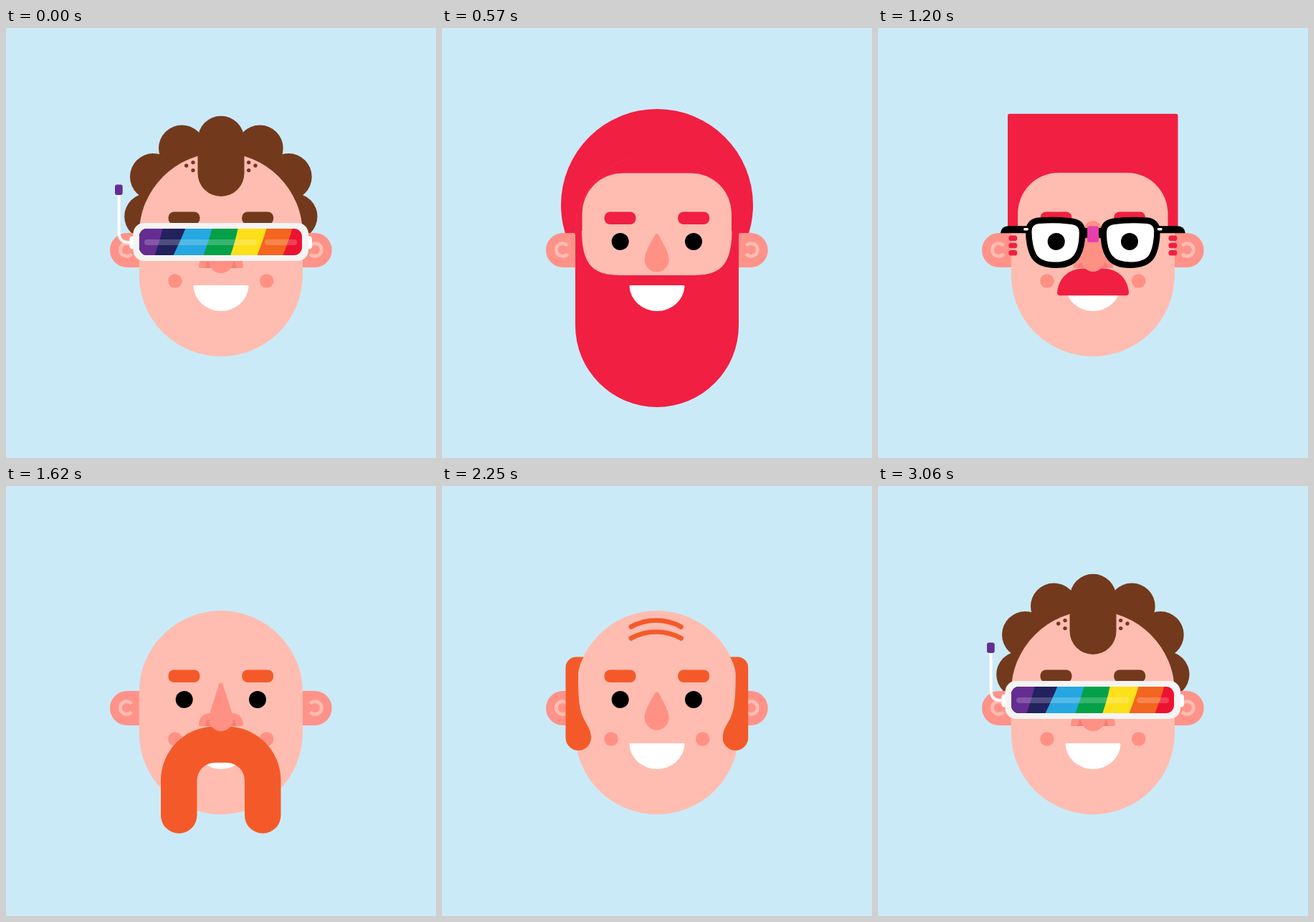
An HTML page that plays this animation: 600 px wide and 600 px high, repeating every 3.12 s.

```html
<!DOCTYPE html>
<html lang="en">
<head>
<meta charset="utf-8">
<title>Faces</title>
<style>
html, body { margin: 0; width: 100%; height: 100%; overflow: hidden; background: #cbeaf7; }
svg { display: block; width: 100%; height: 100%; }
</style>
</head>
<body>
<svg viewBox="0 0 600 600"><g id="face"></g></svg>
<script>
const LOOP = 3120;
const SKIN = '#ffbdb1', EAR = '#ff9289', BLUSH = '#ff9184', SHADE = '#f47f75';
const BROWN = '#73391c', RED = '#f11f42', ORANGE = '#f45a29', BLACK = '#000', WHITE = '#fff';

const path = (d, fill, extra = '') => `<path d="${d}" fill="${fill}" ${extra}/>`;
const line = (d, color, width) =>
  path(d, 'none', `stroke="${color}" stroke-width="${width}" stroke-linecap="round" stroke-linejoin="round"`);
const circle = (x, y, r, fill, extra = '') => `<circle cx="${x}" cy="${y}" r="${r}" fill="${fill}" ${extra}/>`;
const oval = (y, rx, ry, fill) => `<ellipse cx="300" cy="${y}" rx="${rx}" ry="${ry}" fill="${fill}"/>`;
const rect = (x, y, w, h, r, fill, extra = '') =>
  `<rect x="${x}" y="${y}" width="${w}" height="${h}" rx="${r}" fill="${fill}" ${extra}/>`;
const mirror = s => s + `<g transform="matrix(-1 0 0 1 599.7 0)">${s}</g>`;

const HAIRLINE = 'H404.5 V259 A57 57 0 0 0 347.5 202 H252 A57 57 0 0 0 195 259 V283';
const cap = c => path(`M186 283 V288 A114 114 0 0 1 414 288 V283 ${HAIRLINE} Z`, c, `stroke="${c}"`);

// Each hair style has a part behind the head and a part in front of it.
const hair = {
  curly: {
    back: c => path('M205 207 L245 168 L300 155 L354 168 L393 207 L402 263 H197 Z', c) +
      circle(300, 155, 32.3, c) +
      mirror(circle(245.5, 168, 32.5, c) + circle(205.5, 207.5, 32.5, c) + circle(197.5, 263, 32.3, c)),
    front: c => path('M267.5 172 H332.5 V202.5 A32.5 32.5 0 0 1 267.5 202.5 Z', c) +
      mirror(circle(251.7, 192, 2.7, c) + circle(261, 187.6, 2.7, c) + circle(261, 198.6, 2.7, c))
  },
  flat: {
    front: c => path(`M181 283 V122 Q181 119.7 183.5 119.7 H416 Q418.5 119.7 418.5 122 V283 ${HAIRLINE} Z`, c),
    top: c => mirror([289.5, 299.8, 310].map(y => rect(182.3, y, 12, 7.5, 3.6, c)).join(''))
  },
  bald: {
    top: c => mirror(path('M187.5 238.4 H197.6 Q191 250 190 262 C190 292 191 310 197 323 C201 332 208 339 208 351.3 ' +
        'A17.75 17.75 0 0 1 172.5 351.3 V253.4 A15 15 0 0 1 187.5 238.4 Z', c)) +
      line('M263.8 196.5 A72.5 72.5 0 0 1 333.6 196.5 M263.8 212.5 A72.5 72.5 0 0 1 333.6 212.5', c, 6.6)
  },
  afro: { back: c => circle(300, 282, 151, c), front: cap },
  round: { back: c => circle(300, 247, 134, c), front: cap },
  tall: { back: c => oval(254, 153, 170, c), front: cap },
  long: { back: c => path('M147.5 281.5 A152.5 152.5 0 0 1 452.5 281.5 V430 Q452.5 450 432.5 450 H167.5 Q147.5 450 147.5 430 Z', c), front: cap },
  quiff: { back: c => oval(260, 128, 120, c), front: cap },
  crop: { back: c => oval(274, 133, 118, c), front: cap }
};

const dome = 'M269 335 Q269 317 285 317 H315 Q331 317 331 335 Z';
const wings = path(dome, BLUSH) + mirror(path('M278 335 Q279 326 286 323 L292 335 Z', SHADE));
const noses = {
  sharp: wings + path('M297 277 Q299.8 271 302.6 277 L316.5 320 H283.5 Z', BLUSH) + circle(300, 325, 17, BLUSH),
  drop: path('M296.5 290 Q299.8 284 303 290 C308 300 316.7 313 316.7 323.5 A17 17 0 0 1 282.7 323.5 C282.7 313 291 300 296.5 290 Z', BLUSH),
  column: path('M272 335 Q272 318 284 318 H316 Q328 318 328 335 Z', BLUSH) +
    mirror(path('M279 335 Q280 328 286 326 L292 335 Z', SHADE)) +
    path('M288 281 A12 12 0 0 1 312 281 L316 324 A16 16 0 0 1 284 324 Z', BLUSH)
};

const whiskers = {
  shoe: c => path('M216 459.5 V411 A75.5 75.5 0 0 1 291.5 335.5 H308 A75.5 75.5 0 0 1 383.5 411 V459.5 ' +
    'A25.25 25.25 0 0 1 333 459.5 V411 A25 25 0 0 0 308 386 H291.5 A25 25 0 0 0 266.5 411 V459.5 A25.25 25.25 0 0 1 216 459.5 Z', c),
  brush: c => path('M250 369 C252 347 268 335.5 287 335.5 H313 C332 335.5 348 347 350 369 Q350 373.3 346 373.3 H254 Q250 373.3 250 369 Z', c),
  goatee: c => path('M296 405 Q299.8 399 303.6 405 C308 419 317 436 317 451 A17.1 17.1 0 0 1 282.8 451 C282.8 436 292 419 296 405 Z', c)
};
const beard = (bottom, c) => path('M186 282 H195 C195 335 215 345 250 345 H350 C385 345 404.5 335 404.5 282 H414 ' +
  `V${bottom - 114} A114 114 0 0 1 186 ${bottom - 114} Z`, c);

const LENS = 'M210.3 283 C210.5 274 216 269.5 224 268.8 Q249 266.5 272 270 C281 271.5 285 277 285 285 ' +
  'C285 300 282 313 276 320.5 C270 328 261 330.7 248 330.7 C234 330.7 224 328 218 319 C212.5 310 210 295 210.3 283 Z';
const frame = fill => mirror(
  path('M171 286.3 Q172 276.3 182 276.3 H212 V286.3 Z', BLACK) +
  path(LENS, fill, `stroke="${BLACK}" stroke-width="8.5"`) +
  rect(203, 279, 7, 3.5, 1.7, WHITE)) +
  path('M284 278 Q300 281 316 278 V295 Q300 288 284 295 Z', BLACK);

const glint = line('M220 305 L243 282 M227 315 L244 298 M250 292 L263 279', '#686868', 7);

function goggles() {
  const tones = ['#652d91', '#22225f', '#26a7e1', '#05a148', '#fde01a', '#f4651f', '#ed1230'];
  const tops = [219, 251, 288, 324, 364, 400], feet = [207, 233, 275, 313, 350, 386];
  let s = rect(186, 280, 227, 37, 11, tones[6]);
  for (let i = 5; i >= 0; i--) {
    const a = tops[i], b = feet[i];
    s += path(`M180 278 H${a} Q${(a + b) / 2 + 2} 296 ${b} 318 H180 Z`, tones[i], 'clip-path="url(#visor)"');
  }
  return '<clipPath id="visor">' + rect(186, 280, 227, 37, 11, WHITE) + '</clipPath>' +
    line('M157.5 233 V284 Q157.5 299 170 299 H178', WHITE, 4) +
    rect(152, 218.5, 10.7, 14.5, 3, '#652d91') +
    rect(172.5, 290.5, 14, 18, 4, WHITE) + rect(413, 290.5, 14, 18, 4, WHITE) +
    rect(177.5, 272, 244.5, 53, 15, '#f4f4f4') + s +
    rect(193, 295, 157, 8, 4, WHITE, 'opacity=".2"') + rect(361, 295, 45, 8, 4, WHITE, 'opacity=".2"');
}

const glasses = {
  goggles,
  shades: () => frame('#404040') + glint + `<g transform="translate(104 0)">${glint}</g>`,
  square: () => frame(WHITE),
  taped: () => frame(WHITE) + rect(292, 276.5, 16, 22.5, 3, '#e83fae'),
  round: () => mirror(line('M213 289 L184 279.5 Q176 277.5 174.5 285', BLACK, 8) +
    circle(249, 298.5, 35, WHITE, `stroke="${BLACK}" stroke-width="8"`)) +
    line('M286 294 Q289 285 300 285 Q311 285 314 294', BLACK, 8)
};

const base = mirror(path('M187 286 H169 A24 24 0 0 0 169 334 H187 Z', EAR) +
  path('M175.3 303.8 A9 9 0 1 0 175.3 315.2', 'none', `stroke="${SKIN}" stroke-width="4.8"`)) +
  rect(185.7, 174, 228.3, 284.3, 114, SKIN);
const mouth = path('M263 359 H337 Q338.5 359 338.5 361 A38.6 36.6 0 0 1 261.5 361 Q261.5 359 263 359 Z', WHITE);

function draw({ c, style, nose = 'sharp', hairs = [], chin, specs }) {
  const h = hair[style] || {};
  const part = k => h[k] ? h[k](c) : '';
  const hidden = specs === 'goggles' || specs === 'shades';
  return part('back') + base + part('front') +
    mirror(circle(236, 353, 9.8, BLUSH)) +
    part('top') +
    mirror(rect(226.5, 256.5, 44, 17.5, 8, c)) +
    (chin ? beard(chin, c) : '') + mouth +
    hairs.map(k => whiskers[k](c)).join('') +
    noses[nose] +
    (specs ? glasses[specs]() : '') +
    (hidden ? '' : mirror(circle(248.7, 298, 12, BLACK)));
}

const cast = [
  [0, { c: BROWN, style: 'curly', specs: 'goggles' }],
  [150, { c: BROWN, style: 'afro', chin: 489 }],
  [360, { c: BLACK, style: 'bald', nose: 'column', hairs: ['shoe'], specs: 'shades' }],
  [570, { c: RED, style: 'round', nose: 'drop', chin: 529 }],
  [780, { c: BROWN, hairs: ['brush', 'goatee'], specs: 'round' }],
  [990, { c: BLACK, style: 'flat', nose: 'drop', specs: 'square' }],
  [1200, { c: RED, style: 'flat', nose: 'column', hairs: ['brush'], specs: 'taped' }],
  [1410, { c: BLACK, style: 'curly', chin: 489 }],
  [1620, { c: ORANGE, hairs: ['shoe'] }],
  [1830, { c: BROWN, style: 'long' }],
  [2040, { c: BLACK, style: 'quiff', nose: 'column' }],
  [2250, { c: ORANGE, style: 'bald', nose: 'drop' }],
  [2460, { c: BROWN, style: 'crop', hairs: ['brush', 'goatee'] }],
  [2670, { c: RED, style: 'flat', nose: 'drop', chin: 465, specs: 'square' }],
  [2880, { c: BLACK, style: 'tall', chin: 464 }],
  [3060, { c: BROWN, style: 'curly', specs: 'goggles' }]
].map(([at, look]) => ({ at, art: draw(look) }));

const face = document.getElementById('face');
let shown, start;

function render(t) {
  const now = cast.filter(p => p.at <= t).pop();
  if (now !== shown) {
    face.innerHTML = now.art;
    shown = now;
  }
}

function tick(now) {
  if (start === undefined) start = now;
  render(Math.max(0, now - start) % LOOP);
  requestAnimationFrame(tick);
}
render(0);
requestAnimationFrame(tick);
</script>
</body>
</html>
```
